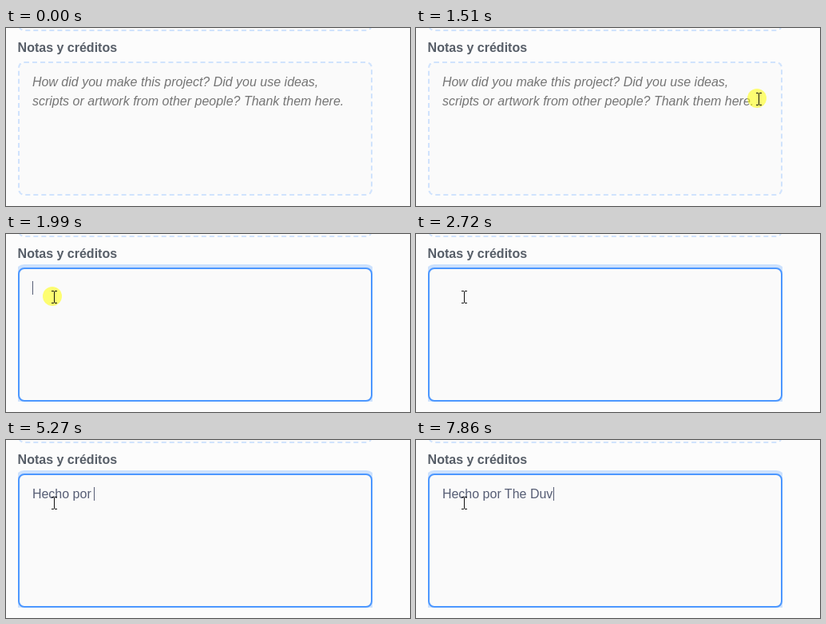
Recreate the animation shown at these times as an HTML page. Size 506x223 px, loop 8 s.

```html
<!DOCTYPE html>
<html lang="es">
<head>
<meta charset="utf-8">
<title>Notas y créditos</title>
<style>
  html, body { margin: 0; width: 100%; height: 100%; overflow: hidden; background: #fcfcfc; }
  body { position: relative; font: 16px/24px "Liberation Sans", Arial, sans-serif; color: #575e75; }
  body > *, .field { position: absolute; box-sizing: border-box; }
  .field {
    left: 0; width: 444px; height: 168px; border-radius: 8px;
    border: 2px dashed rgba(76, 151, 255, .25); background: #fafafa; background-clip: padding-box;
  }
  #upper { left: 15px; top: -164px; }
  #clip { left: 15px; top: 38px; width: 444px; height: 172px; overflow: hidden; }
  #notes { top: 4px; }
  #label { left: 14.6px; top: 13px; font-weight: bold; color: #575e68; white-space: pre; }
  #hint, #typed { left: 32.9px; top: 56px; white-space: pre; }
  #hint { font-style: italic; color: #757575; }
  #caret { top: 59px; width: 1px; height: 17px; background: #575e75; }
  #pointer { left: 0; top: 0; overflow: visible; }
</style>
</head>
<body>
<div class="field" id="upper"></div>
<div id="label">Notas y créditos</div>
<div id="clip"><div class="field" id="notes"></div></div>
<div id="hint">How did you make this project? Did you use ideas,
scripts or artwork from other people? Thank them here.</div>
<div id="typed"></div>
<div id="caret"></div>
<svg id="pointer" width="7" height="16">
  <circle id="spot" cx="1" cy="7" r="12" fill="#ff0" fill-opacity=".55"/>
  <path d="M0 .5h3M4 .5h3M3.5 1v14M0 15.5h3M4 15.5h3" fill="none" stroke="#111"/>
</svg>
<script>
const LOOP = 8000, TICK = 70, TEXT_LEFT = 32.9;
const PHRASE = "Hecho por The Duv";
const KEY_TIMES = [3350, 3750, 4080, 4280, 4410, 4540, 4610, 4740, 5070, 5270,
                   6130, 6530, 6600, 6730, 7460, 7730, 7860];
const CARET_OFF = [[0, 1640], [2720, 3220], [5800, 6130], [7260, 7460]];

const [notes, hint, typed, caret, pointer, spot] =
  ["notes", "hint", "typed", "caret", "pointer", "spot"].map(id => document.getElementById(id));
const ruler = document.createElement("canvas").getContext("2d");
ruler.font = '16px "Liberation Sans", Arial, sans-serif';

const mix = (a, b, k) => a + (b - a) * k;
const within = (t, [from, to]) => t >= from && t < to;
const easeOut = (k, power) => 1 - (1 - k) ** power;
const smooth = k => k * k * (3 - 2 * k);
const show = (el, on) => { el.style.visibility = on ? "visible" : "hidden"; };

function progress(t, from, to) {
  const held = Math.floor((t - from) / TICK) * TICK;
  return Math.min(1, Math.max(0, held / (to - from)));
}

function pointerAt(t) {
  if (t < 1640) {
    const k = progress(t, 130, 1180);
    return [mix(348, 426, easeOut(k, 1.2)), mix(186, 81, easeOut(k, 2.66))];
  }
  const k = smooth(progress(t, 1640, 1990));
  return [mix(426, 57, k), mix(81, 71, k)];
}

function drawFocus(t) {
  const focused = t >= 1640;
  const k = focused ? easeOut(mix(130 / 480, 1, progress(t, 1640, 1990)), 2.2) : 0;
  notes.style.borderStyle = focused ? "solid" : "dashed";
  notes.style.borderColor = `rgba(76, 151, 255, ${mix(.25, 1, k)})`;
  notes.style.boxShadow = `0 0 0 ${4 * k}px rgba(76, 151, 255, ${.27 * k})`;
  hint.style.opacity = 1 - k;
}

function drawText(t) {
  const text = PHRASE.slice(0, KEY_TIMES.filter(time => time <= t).length);
  typed.textContent = text;
  const nudge = text.endsWith(" ") ? 1 : 0;
  caret.style.left = Math.round(TEXT_LEFT + ruler.measureText(text).width) - nudge + "px";
  show(caret, !CARET_OFF.some(span => within(t, span)));
}

function drawPointer(t) {
  const [x, y] = pointerAt(t).map(Math.round);
  pointer.style.transform = `translate(${x}px, ${y}px)`;
  pointer.style.display = t >= 130 ? "block" : "none";
  show(spot, within(t, [1510, 2260]));
}

const start = performance.now();
function render() {
  const t = (performance.now() - start) % LOOP;
  drawFocus(t);
  drawText(t);
  drawPointer(t);
  requestAnimationFrame(render);
}
render();
</script>
</body>
</html>
```
